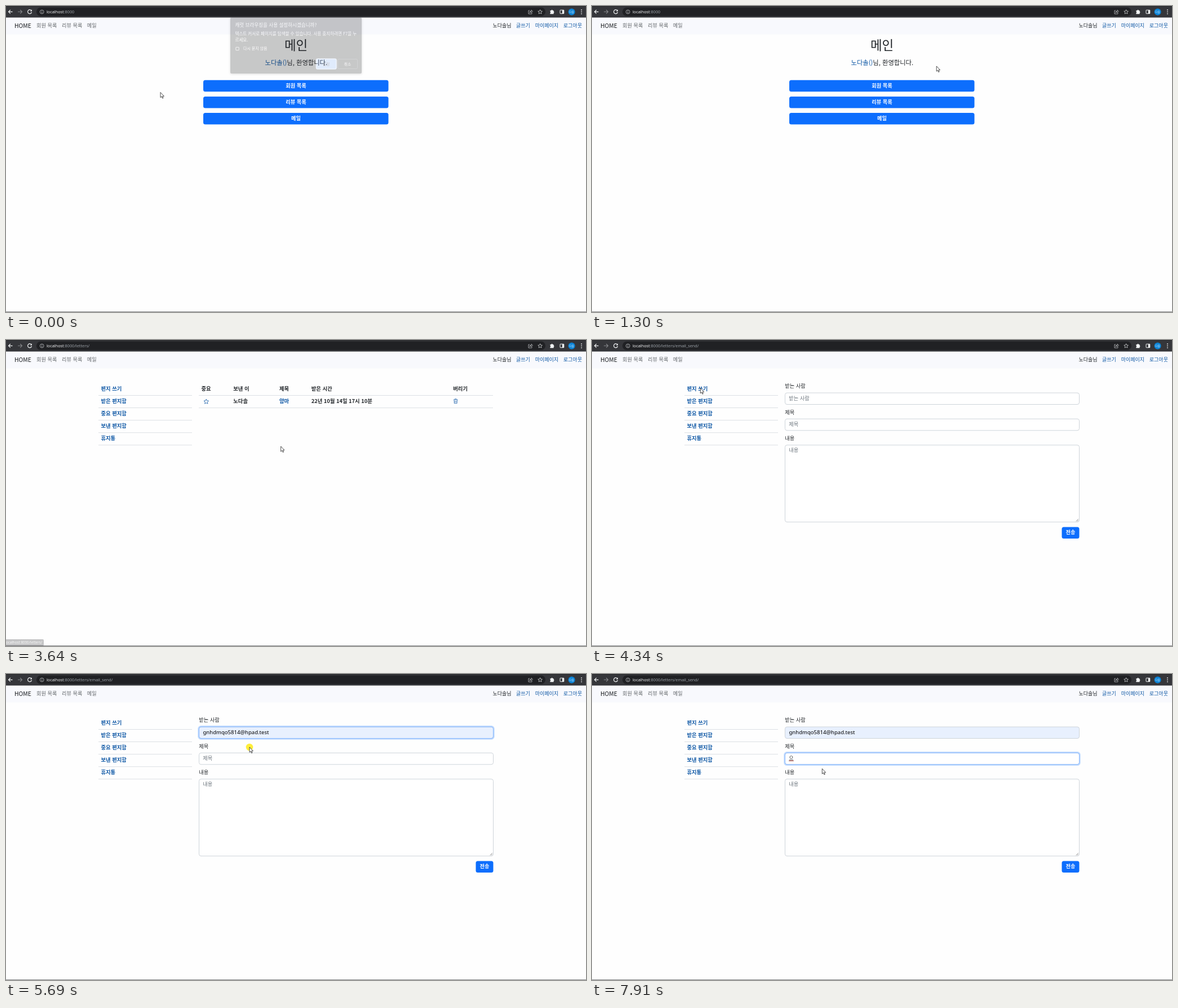
Recreate the animation shown at these times as an HTML page. Size 1029 by 544 pixels, loop 7.99 s.

```html
<!DOCTYPE html>
<html lang="ko">
<head>
<meta charset="utf-8">
<title>Mail form</title>
<style>
html, body { margin: 0; width: 100%; height: 100%; overflow: hidden; background: #fefefe; }
svg { display: block; width: 100%; height: 100%; }
text { font-family: 'Noto Sans CJK KR', 'Noto Sans CJK', 'Noto Sans CJK JP', sans-serif; white-space: pre; }
text.latin { font-family: 'Noto Sans', 'Open Sans', sans-serif; }
</style>
</head>
<body>
<svg id="stage" viewBox="0 0 1029 544"></svg>
<script>
const LOOP = 7990;
const INK = '#212529', LINK = '#0d57a5', BLUE = '#0d6efd', GREY = '#6c757d', DARK = '#202124';
const USER = '노다솔', MAIL = 'gnhdmqo5814@hpad.test';
const HOST = 'localhost:8000';
const stage = document.getElementById('stage');

// Markup helpers; text is placed by its vertical centre.
const text = (s, x, cy, size = 9.2, fill = INK, more = '') =>
  `<text x="${x}" y="${cy + size * .37}" font-size="${size}" fill="${fill}" ${more}>${s}</text>`;
const rect = (x, y, w, h, fill, r = 0, more = '') =>
  `<rect x="${x}" y="${y}" width="${w}" height="${h}" rx="${r}" fill="${fill}" ${more}/>`;
const path = (d, stroke, w = 1, fill = 'none', more = '') =>
  `<path d="${d}" stroke="${stroke}" stroke-width="${w}" fill="${fill}" ${more}/>`;
const group = (id, body, more = '') => `<g id="${id}" ${more}>${body}</g>`;
const BOLD = 'font-weight="700"', MED = 'font-weight="500"', LATIN = 'class="latin"';
const MID = 'text-anchor="middle" ';

function starPath(cx, cy, r) {
  let d = '';
  for (let i = 0; i < 10; i++) {
    const a = -Math.PI / 2 + i * Math.PI / 5, q = i % 2 ? r * .48 : r;
    d += (i ? 'L' : 'M') + (cx + q * Math.cos(a)).toFixed(2) + ' ' + (cy + q * Math.sin(a)).toFixed(2);
  }
  return d + 'Z';
}

function browserBar() {
  return rect(0, 0, 1029, 20.5, '#35363a') + rect(0, 0, 1029, 1, '#28292c') +
    rect(54, 2.5, 903, 15.5, DARK, 7.75) +
    path('M11.5 10.3H4.5M7.8 7L4.5 10.3L7.8 13.6', '#f1f3f4', 1.2) +
    path('M21 10.3H28.5M25.2 7L28.5 10.3L25.2 13.6', '#85878a', 1.1) +
    group('reload', path('M45 8.2A3.5 3.5 0 1 0 45.5 11', '#f1f3f4', 1.2) +
      path('M45.9 6.3V9.4H42.8Z', 'none', 0, '#f1f3f4')) +
    group('stop', path('M39 7.2L45.4 13.6M45.4 7.2L39 13.6', '#f1f3f4', 1.2)) +
    '<circle cx="63.7" cy="10.4" r="3.4" fill="none" stroke="#c4c7ca" stroke-width=".8"/>' +
    path('M63.7 9.9V12.4M63.7 8.2V9.1', '#c4c7ca', .9) +
    `<text x="72" y="13" font-size="7.25" class="latin" fill="#f1f3f4">localhost<tspan id="url" fill="#9aa0a6"></tspan></text>` +
    path('M929 8H927V14H933V12.3M929 11.8Q929.4 8.8 932 8.8V7L934.4 9.5L932 11.9V10.3Q930.2 10.2 929 11.8Z', '#c4c7ca', .8) +
    path(starPath(947.6, 10.6, 4), '#d5d7d9', .8) +
    path('M965.4 8H967.3A1.3 1.3 0 0 1 969.9 8H971.6V9.8A1.4 1.4 0 0 1 971.6 12.4V14.2H965.4V12.2A1.2 1.2 0 0 0 965.4 9.9Z', 'none', 0, '#f1f3f4') +
    rect(983, 7.2, 6.8, 6.4, 'none', .6, 'stroke="#f1f3f4"') + rect(986.8, 7.2, 3, 6.4, '#f1f3f4') +
    '<circle cx="1003.6" cy="10.4" r="6" fill="#0b84d8"/>' +
    text('다솔', 1003.6, 10.4, 4.6, '#e4f3ff', MID) +
    [7, 10.4, 13.8].map(y => `<circle cx="1021" cy="${y}" r=".9" fill="#f1f3f4"/>`).join('');
}

function navBar() {
  return rect(0, 20.5, 1029, 30, '#f8f9fd') + text('HOME', 15, 34.7, 10.4, '#16191c') +
    [['회원 목록', 54], ['리뷰 목록', 99], ['메일', 143.7]].map(([s, x]) => text(s, x, 34.5, 9.2, '#63676b')).join('') +
    text(USER + '님', 863.5, 34.5, 9, INK, MED) +
    [['글쓰기', 905], ['마이페이지', 938.7], ['로그아웃', 988.8]].map(([s, x]) => text(s, x, 34.5, 9, LINK, MED)).join('');
}

const BTN_Y = [131.8, 161, 190];
function mainPage() {
  return text('메인', 514.5, 70, 22.4, INK, MID + MED) +
    `<text x="459.5" y="105" font-size="11.3" fill="${INK}"><tspan fill="${LINK}">${USER}()</tspan>님, 환영합니다.</text>` +
    ['회원 목록', '리뷰 목록', '메일'].map((s, i) =>
      rect(350, BTN_Y[i], 328.5, 20.4, BLUE, 3.5, `id="btn${i}"`) +
      text(s, 514.5, BTN_Y[i] + 9.4, 9.2, '#fff', MID + BOLD)).join('');
}

function sideMenu() {
  return ['편지 쓰기', '받은 편지함', '중요 편지함', '보낸 편지함', '휴지통'].map((s, i) =>
    text(s, 168.5, 86.2 + i * 22.1, 9.3, LINK, BOLD) +
    rect(164, 98 + i * 22.1, 166, .9, '#d9dde1')).join('');
}

function listPage() {
  const cell = (s, x, y, c = INK) => text(s, x, y, 9.3, c, BOLD);
  return cell('중요', 346.5, 86.2) + cell('보낸 이', 403.3, 86.2) + cell('제목', 485, 86.2) +
    cell('받은 시간', 541.7, 86.2) + cell('버리기', 793.3, 86.2) +
    [98, 120.2].map(y => rect(342, y, 522, .9, '#d9dde1')).join('') +
    path(starPath(355.3, 109.6, 4.5), LINK, .8) +
    cell(USER, 403.3, 108.5) + cell('얌마', 485, 108.5, LINK) + cell('22년 10월 14일 17시 10분', 541.7, 108.5) +
    path('M794 106H801.4M796.4 106V104.8H799V106M794.8 106.3L795.3 112.7H800.1L800.6 106.3M796.6 107.6V111.4M798.8 107.6V111.4', LINK, .7);
}

function formPage() {
  const ring = (i, y) => group('ring' + i,
    rect(341.4, y - 1.1, 524.2, 22.7, 'none', 4.4, 'stroke="#c2dbfe" stroke-width="2.3"') +
    rect(342.5, y, 522, 20.5, 'none', 3.5, 'stroke="#86b7fe"'));
  const box = (y, h, id) => rect(342.5, y, 522, h, '#fff', 3.5, `id="${id}" stroke="#ced4da"`);
  return text('받는 사람', 342.3, 82, 9.2, INK, MED) + text('제목', 342.3, 128.3, 9.2, INK, MED) +
    text('내용', 342.3, 174.8, 9.2, INK, MED) +
    box(94, 20.5, 'toBox') + box(140.3, 20.5, 'subBox') + box(186.8, 136.8, 'bodyBox') +
    ring(0, 94) + ring(1, 140.3) +
    group('toHint', text('받는 사람', 349.3, 103.3, 9.2, GREY)) +
    group('toText', text(MAIL, 349.5, 103.4, 9.55, '#000', LATIN)) +
    group('subHint', text('제목', 349.3, 149.6, 9.2, GREY)) +
    group('subText', text('으', 349.5, 150.3, 8.6, INK) + rect(349.5, 154.2, 8, .8, INK)) +
    rect(349.5, 153.6, 8, 1.4, '#a4524e', 0, 'id="spell"') +
    text('내용', 349.3, 196, 9.2, GREY) +
    path('M858.8 322.3L862.8 318.3M861 322.3L862.8 320.5', '#777', .8) +
    rect(833.5, 332.4, 31, 20.6, BLUE, 3.5) + text('전송', 849, 342, 9.2, '#fff', MID + BOLD) +
    rect(349.3, 98.6, .8, 11, '#000', 0, 'id="caret"') +
    group('popup', path('M402.5 120L407.3 115L412 120Z', 'none', 0, '#292a2d') +
      rect(396, 119.6, 103.5, 62.4, '#292a2d', 2) + rect(396, 122.2, 103.5, 19, '#45474a', 0, 'id="pick"') +
      [MAIL, 'e', 'rhkmwlqs@oxu'].map((s, i) => text(s, 402.3, 131.6 + i * 19.4, 6.6, '#eceef0', LATIN)).join(''));
}

function dialog() {
  return rect(398, 20.5, 233, 99.5, '#292a2d', 2, 'style="filter:drop-shadow(0 1px 2px #0008)"') +
    text('캐럿 브라우징을 사용 설정하시겠습니까?', 406.5, 34.3, 8.55, '#fff') +
    text('텍스트 커서로 페이지를 탐색할 수 있습니다. 사용 중지하려면 F7을 누', 406.5, 49.4, 7.5, '#fff') +
    text('르세요.', 406.5, 59.8, 7.5, '#fff') +
    rect(407.8, 73.3, 5.4, 5.4, 'none', .6, 'stroke="#fff" stroke-width=".8"') +
    text('다시 묻지 않음', 421, 75.8, 7, '#fff') +
    rect(550.5, 94, 35.5, 18, '#8ab4f8', 2.5, 'stroke="#c5dafc" stroke-width="1.6"') +
    text('설정', 568, 103, 6.8, '#202124', MID) +
    rect(588.5, 94.5, 35, 17, 'none', 2, 'stroke="#5f6368" stroke-width=".8"') +
    text('취소', 606, 103, 6.8, '#fff', MID);
}

function pointers() {
  return group('arrow', path('M0 0V9.2L2.1 7.3L3.6 10.6L5 10L3.6 6.8H6.4Z', '#222', .8, '#fff')) +
    group('hand', path('M1 6.5V1.2Q1.1 .2 2 .2Q2.9 .2 3 1.2V4.4L6.6 5.2Q7.6 5.5 7.5 6.6L6.8 9.5V11.6H2.2V10.2L-.9 7Q-1.3 5.8 0 5.7Z', '#222', .8, '#fff')) +
    group('beam', path('M-2 -4.5H-.6L0 -4L.6 -4.5H2M0 -4V4M-2 4.5H-.6L0 4L.6 4.5H2', '#222', .9));
}

stage.innerHTML = rect(0, 0, 1029, 544, '#fefefe') + navBar() +
  group('main', mainPage()) + group('side', sideMenu()) + group('list', listPage()) + group('form', formPage()) +
  rect(0, 543.2, 1029, .8, '#6a6b6d') +
  group('status', rect(-3, 532, 70, 12, DARK, 2, 'id="statusBox"') +
    `<text id="statusText" class="latin" x="-1.7" y="540.3" font-size="6.25" fill="#f1f3f4"></text>`) +
  browserBar() + group('dialog', dialog()) +
  '<circle id="click" r="6.3" fill="#ffee3a"/>' + group('pointer', pointers());

const el = {};
stage.querySelectorAll('[id]').forEach(n => el[n.id] = n);
const show = (id, on) => el[id].setAttribute('visibility', on ? 'inherit' : 'hidden');
const fade = (id, v) => el[id].setAttribute('opacity', v.toFixed(3));
const ramp = (t, a, b) => Math.min(1, Math.max(0, (t - a) / (b - a)));
const within = (t, a, b) => t >= a && t < b;

// Pointer stops: time, x, y
const TRACK = [
  [0, 274, 153.5], [430, 274, 153.5], [650, 390, 135], [850, 540, 112], [1000, 621, 102], [1220, 611, 107.2],
  [1330, 610.5, 107.6], [1600, 592, 124], [1850, 556, 139], [2050, 522, 170], [2150, 508, 196], [2250, 505.5, 201],
  [3540, 505.5, 201], [3640, 488.3, 189.3], [3850, 300, 125], [4030, 195, 90], [4120, 186, 85], [4310, 186, 85],
  [4620, 411, 105.8], [5350, 411, 105.8], [5540, 432, 130], [5700, 432, 130], [5950, 388, 152], [6040, 382.5, 154.3],
  [6370, 382.5, 154.3], [6560, 403, 179], [6760, 408.3, 168.3], [LOOP, 408.3, 168.3]
];

function slope(i, k) {
  const a = TRACK[i - 1], b = TRACK[i], c = TRACK[i + 1];
  if (!a || !c || a[k] === b[k] || b[k] === c[k]) return 0;
  return (c[k] - a[k]) / (c[0] - a[0]);
}

function pointerAt(t) {
  let i = 0;
  while (i < TRACK.length - 2 && TRACK[i + 1][0] <= t) i++;
  const a = TRACK[i], b = TRACK[i + 1], h = b[0] - a[0], u = ramp(t, a[0], b[0]), u2 = u * u, u3 = u2 * u;
  return [1, 2].map(k => (2 * u3 - 3 * u2 + 1) * a[k] + (u3 - 2 * u2 + u) * h * slope(i, k) +
    (3 * u2 - 2 * u3) * b[k] + (u3 - u2) * h * slope(i + 1, k));
}

const LIST_AT = 3190, FORM_AT = 4270;
const overButton = t => {
  const [x, y] = pointerAt(t);
  return x > 350 && x < 678 ? BTN_Y.findIndex(b => y >= b && y <= b + 20.4) : -1;
};

// Mean hover over the last 150 ms gives the button's colour transition.
function hoverLevel(i, t) {
  let n = 0;
  for (let k = 0; k < 10; k++) n += overButton(Math.max(0, t - k * 15)) === i;
  return n / 10;
}

function drawStatus(t) {
  let page = '', alpha = 0;
  if (t < 3700) {
    const y = pointerAt(Math.max(0, t - 60))[1];
    if (t > 1300 && y >= BTN_Y[0]) {
      page = ['/accounts/', '/reviews/', '/letters/'][y < BTN_Y[1] ? 0 : y < BTN_Y[2] ? 1 : 2];
      alpha = 1 - ramp(t, 3540, 3675);
    }
  } else if (within(t, 4100, FORM_AT)) {
    page = '/letters/email_send/';
    alpha = 1;
  }
  el.statusText.textContent = HOST + page;
  el.statusBox.setAttribute('width', page.length > 12 ? 108 : 70);
  fade('status', alpha);
}

function drawForm(t) {
  const filled = t >= 5500, typed = t >= 6920;
  const toSub = ramp(t, 6110, 6215);
  fade('ring0', ramp(t, 4950, 5080) * (1 - toSub));
  fade('ring1', toSub);
  el.toBox.setAttribute('fill', filled ? '#e8f0fe' : '#fff');
  show('toHint', !filled);
  show('toText', filled);
  show('subHint', !typed);
  show('subText', typed);
  show('spell', t >= 7910);
  show('popup', within(t, 5010, 5690));
  show('pick', within(t, 5500, 5690));
  const inSub = t >= 6080;
  show('caret', within(t, 4960, 5480) || within(t, 6080, 6610) || within(t, 6920, 7430));
  el.caret.setAttribute('x', typed ? 357.3 : 349.3);
  el.caret.setAttribute('y', inSub ? 145 : 98.6);
}

function pointerKind(t, x, y) {
  if (t < 3540) return overButton(t) >= 0 || t >= 2250 ? 'hand' : 'arrow';
  if (t < FORM_AT) return x < 206 && y > 81 && y < 92 ? 'hand' : 'arrow';
  if (within(t, 5010, 5690) && y > 119) return 'arrow';
  const inBox = x > 342 && (within(y, 94, 114.5) || within(y, 140.3, 160.8));
  return inBox ? 'beam' : 'arrow';
}

function render(t) {
  const isMain = t < LIST_AT, isForm = t >= FORM_AT;
  show('main', isMain);
  show('side', !isMain);
  show('list', !isMain && !isForm);
  show('form', isForm);
  el.url.textContent = ':8000' + (isMain ? '' : isForm ? '/letters/email_send/' : '/letters/');
  const loading = within(t, 3150, 3240) || within(t, 4225, 4300);
  show('stop', loading);
  show('reload', !loading);
  fade('dialog', .25 * (1 - ramp(t, 15, 200)));

  for (let i = 0; i < 3; i++) {
    const h = hoverLevel(i, t);
    el['btn' + i].setAttribute('fill', `rgb(${13 - 2 * h},${110 - 16 * h},${253 - 38 * h})`);
  }
  drawStatus(t);
  drawForm(t);

  const [x, y] = pointerAt(t), kind = pointerKind(t, x, y);
  const dx = kind === 'hand' ? -.5 : 0;
  el.pointer.setAttribute('transform', `translate(${x + dx} ${y})`);
  for (const k of ['arrow', 'hand', 'beam']) show(k, k === kind);
  show('click', [3120, 4170, 4950, 5620, 6060].some(c => within(t, c, c + 95)));
  el.click.setAttribute('cx', x);
  el.click.setAttribute('cy', y);
}

const start = performance.now();
function tick() {
  render((performance.now() - start) % LOOP);
  requestAnimationFrame(tick);
}
tick();
</script>
</body>
</html>
```
